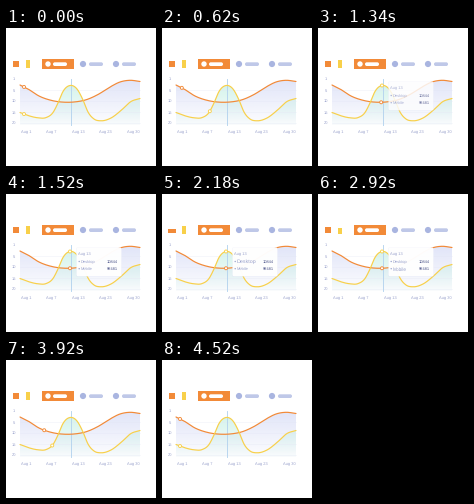
Recreate the animation shown at these times as a matplotlib script. Size 150 px wide and 138 px high, loop 4.8 s.

```python
import numpy as np
import matplotlib.pyplot as plt
from matplotlib.animation import FuncAnimation
from matplotlib.colors import to_rgba
from matplotlib.patches import Circle, FancyBboxPatch, Polygon, Rectangle

W, H, DPI = 150, 138, 100
STEP, LOOP = 20, 4800
ORANGE, YELLOW = "#f28a38", "#f8d04a"
LABEL, NAVY = "#9aa2cc", "#4a5288"
REST_X, FOCUS_X = 18, 64
FLOOR = 97

plt.rcParams["font.family"] = "Liberation Sans"
plt.rcParams["text.hinting"] = "none"

fig = plt.figure(figsize=(W / DPI, H / DPI), dpi=DPI, facecolor="white")
ax = fig.add_axes([0, 0, 1, 1])
ax.set_xlim(0, W)
ax.set_ylim(H, 0)
ax.axis("off")


def pt(px):
    return px * 72 / DPI


def label(x, y, text, size=4, color=LABEL, ha="center", **kw):
    return ax.text(x, y, text, fontsize=pt(size), color=color, ha=ha,
                   va="center_baseline", **kw)


def pill(x0, y0, x1, y1, color, radius, **kw):
    box = FancyBboxPatch((x0, y0), x1 - x0, y1 - y0, fc=color, ec="none",
                         boxstyle=f"round,pad=0,rounding_size={radius}", **kw)
    return ax.add_patch(box)


def dot(x, y, r, color, **kw):
    return ax.add_patch(Circle((x, y), r, fc=color, **kw))


def smooth(points, n=600):
    """Cubic Hermite curve through the points."""
    px, py = np.array(points, float).T
    slope = np.gradient(py, px)
    x = np.linspace(px[0], px[-1], n)
    i = np.clip(np.searchsorted(px, x, side="right") - 1, 0, len(px) - 2)
    h = px[i + 1] - px[i]
    t = (x - px[i]) / h
    y = ((2 * t**3 - 3 * t**2 + 1) * py[i] + (t**3 - 2 * t**2 + t) * h * slope[i]
         + (3 * t**2 - 2 * t**3) * py[i + 1] + (t**3 - t**2) * h * slope[i + 1])
    return x, y


def fill_under(curve, color, alpha, zorder):
    """Vertical fade from the curve's top down to the chart floor."""
    x, y = curve
    top = y.min()
    ramp = np.empty((64, 1, 4))
    ramp[:] = to_rgba(color)
    ramp[:, 0, 3] = np.linspace(alpha, 0.04, 64)
    img = ax.imshow(ramp, extent=[x[0], x[-1], FLOOR, top], aspect="auto",
                    interpolation="bilinear", zorder=zorder)
    outline = np.vstack([np.c_[x, y], [x[-1], FLOOR], [x[0], FLOOR]])
    clip = Polygon(outline, fc="none", ec="none")
    ax.add_patch(clip)
    img.set_clip_path(clip)


def keyed(t, keys):
    """Cosine easing between (time, value) keys."""
    for (t0, a), (t1, b) in zip(keys, keys[1:]):
        if t <= t1:
            p = max(0, (t - t0) / (t1 - t0))
            return a + (b - a) * (1 - np.cos(np.pi * p)) / 2
    return keys[-1][1]


orange_line = smooth([(14, 57), (22, 61), (33, 68), (45, 72.3), (58, 74.2),
                      (68, 74), (80, 71.8), (92, 66.5), (104, 59), (114, 54),
                      (124, 52.3), (134, 53.5)])
yellow_line = smooth([(14, 84.5), (22, 87.5), (32, 89.8), (40, 89.6), (47, 84.5),
                      (52, 75), (57, 63.5), (64, 57.5), (71, 61), (77, 72),
                      (82, 84), (88, 91), (95, 92.8), (105, 90), (115, 82.5),
                      (125, 73.5), (134, 70.5)])

# Chart
fill_under(orange_line, "#c3cbf2", 0.5, 0)
fill_under(yellow_line, "#c4efe4", 0.7, 1)
for y in (62, 73, 84, 95):
    ax.plot([14, 134], [y, y], color="#e3e6f5", lw=pt(0.5), alpha=0.6, zorder=1)
ax.plot([FOCUS_X + 0.5] * 2, [51, FLOOR], color="#b4d3ee", lw=pt(0.9), zorder=2)
for curve, color in ((orange_line, ORANGE), (yellow_line, YELLOW)):
    ax.plot(*curve, color=color, lw=pt(1.2), solid_capstyle="round", zorder=3)
for y, text in zip((51, 62, 73, 84, 95), ("1", "5", "10", "15", "20")):
    label(8, y, text)
for x, day in zip((20, 45, 72, 99.5, 127), (1, 7, 13, 23, 30)):
    label(x, 103.5, f"Aug {day}")

# Filter row
ax.add_patch(Rectangle((36, 31), 32, 10, fc=ORANGE, ec="none"))
dot(42, 36, 2.7, "white", ec="none")
pill(47, 34.3, 61, 38, "white", 1.8)
for x in (77, 110):
    dot(x, 36, 3.1, "#a9b5e0", ec="none")
    pill(x + 6, 34.3, x + 20, 38, "#bfc8e8", 1.8)


class Icon:
    def __init__(self, cx, width, top, base, color):
        self.cx, self.width, self.base = cx, width, base
        self.height = base - top
        self.box = ax.add_patch(Rectangle((0, 0), 1, 1, fc=color, ec="none"))

    def pose(self, lift, squash):
        w = self.width * (1 + 0.7 * (1 - squash))
        h = self.height * squash
        self.box.set_bounds(self.cx - w / 2, self.base - lift - h, w, h)


class Marker:
    def __init__(self, curve, color, keys):
        self.x, self.y = curve
        steps = np.hypot(np.diff(self.x), np.diff(self.y))
        self.dist = np.r_[0, np.cumsum(steps)]
        self.ends = np.interp([REST_X, FOCUS_X], self.x, self.dist)
        self.keys = keys
        self.ring = dot(0, 0, 1.5, "white", ec=color, lw=pt(0.9), zorder=5)

    def pose(self, t):
        start, stop = self.ends
        d = start + keyed(t, self.keys) * (stop - start)
        self.ring.center = (np.interp(d, self.dist, self.x),
                            np.interp(d, self.dist, self.y))


icons = [Icon(10, 6, 33, 39, ORANGE), Icon(22, 4, 32.3, 39.7, YELLOW)]
back = [(3520, 1), (4300, -0.02), (4500, 0)]
markers = [
    Marker(yellow_line, YELLOW, [(0, 0), (1220, 1)] + back),
    Marker(orange_line, ORANGE,
           [(0, 0), (160, 0), (420, -0.06), (1420, 1)] + back),
]

# Tooltip
panel = [(pill(70, 53.3, 116, 83, "#c9cfec", 2, zorder=6), 0.22),
         (pill(70.5, 53.5, 115.5, 82.3, "white", 1.5, zorder=7), 0.97)]
texts = [label(72.5, 59.5, "Aug 13", ha="left", zorder=8)]
rows = []
for y, name, value in ((67.5, "Desktop", "10844"), (74.7, "Mobile", "98481")):
    bullet = dot(73.2, y, 0.7, LABEL, ec="none", zorder=8)
    row = label(75, y, name, ha="left", zorder=8)
    number = label(112, y, value, color=NAVY, ha="right", zorder=8)
    rows.append(row)
    texts += [bullet, row, number]
panel += [(item, 1) for item in texts]

FADE = [(1120, 0), (1420, 1), (3580, 1), (3850, 0)]
SQUASH = [(0, 1), (240, 0.6), (300, 0.6), (400, 1.08), (520, 1),
          (580, 0.82), (660, 1)]
LIFT = [(290, 0), (410, 5.3), (540, 0)]
GROW = [[(0, 1), (220, 1.33), (540, 1.33), (660, 1)],
        [(0, 1), (220, 1.33), (680, 1.33), (780, 1)]]
CUES = (1900, 2800)


def draw(i):
    t = i * STEP
    for marker in markers:
        marker.pose(t)
    for icon, row, cue, grow in zip(icons, rows, CUES, GROW):
        icon.pose(keyed(t - cue, LIFT), keyed(t - cue, SQUASH))
        row.set_fontsize(pt(4 * keyed(t - cue, grow)))
    shown = keyed(t, FADE)
    for item, full in panel:
        item.set_alpha(full * shown)
        item.set_visible(shown > 0)
    return []


anim = FuncAnimation(fig, draw, frames=LOOP // STEP, interval=STEP,
                     init_func=lambda: draw(0), repeat=True, repeat_delay=0)
plt.show()
```
